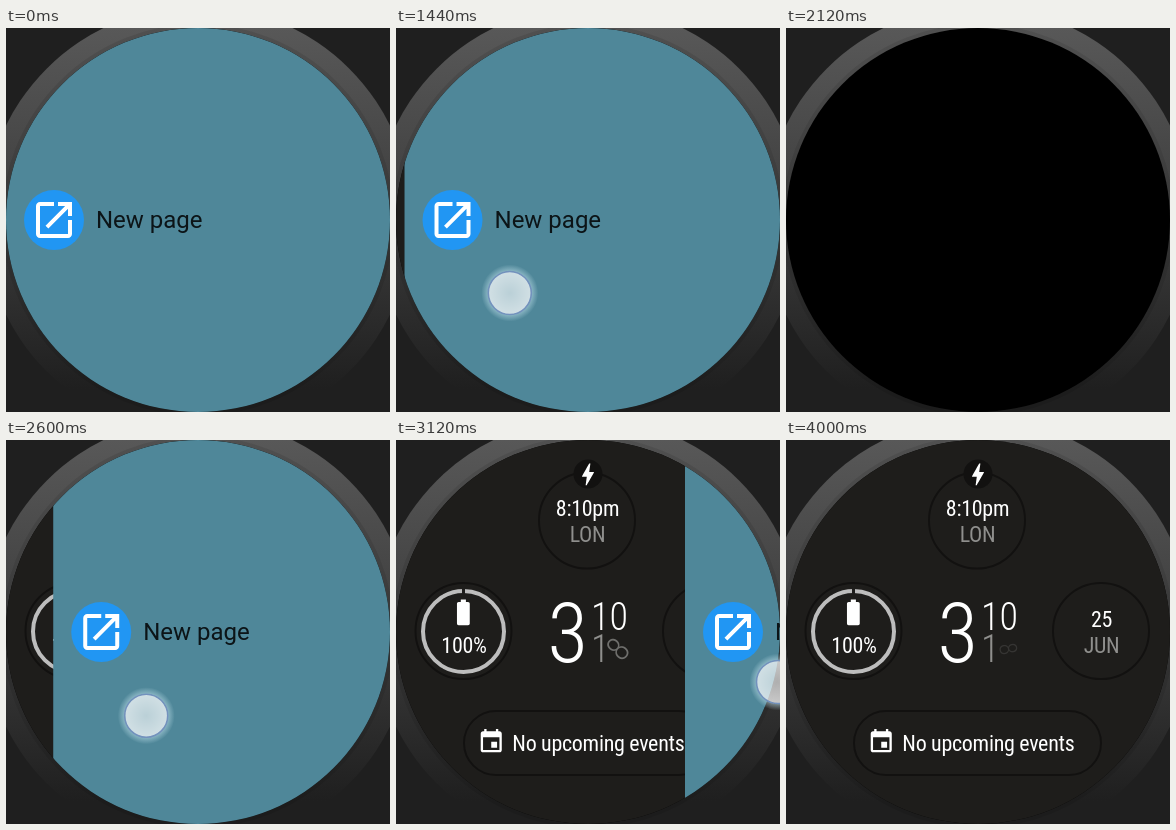
Animation of 384 by 384 pixels, one loop 4040 ms. Source, as an HTML page:

```html
<!DOCTYPE html>
<html lang="en">
<head>
<meta charset="utf-8">
<title>Swipe to dismiss</title>
<style>
  html, body { margin: 0; width: 100%; height: 100%; overflow: hidden; background: #1f1f1f; }
  svg { display: block; width: 100vw; height: 100vh; }
  .label { font: 24px Roboto, sans-serif; fill: #0c1417; }
  .narrow text { font-family: "Roboto Condensed", Roboto, sans-serif; font-stretch: condensed; font-size: 22px; letter-spacing: -.3px; fill: #fff; }
  .narrow .dim { fill: #8f8f8d; }
  .narrow .mid { text-anchor: middle; }
  .narrow .hour { font-size: 83px; font-weight: 300; letter-spacing: 0; }
  .narrow .small { font-size: 38px; font-weight: 300; letter-spacing: 0; }
  .outline { fill: none; stroke: #121110; stroke-width: 2; }
</style>
</head>
<body>
<svg viewBox="0 0 384 384">
  <defs>
    <linearGradient id="metal" gradientUnits="userSpaceOnUse" x1="0" y1="0" x2="0" y2="384">
      <stop offset="0" stop-color="#585858"/>
      <stop offset=".26" stop-color="#4a4a4a"/>
      <stop offset=".5" stop-color="#3c3c3c"/>
      <stop offset=".76" stop-color="#2b2b2b"/>
      <stop offset=".94" stop-color="#1f1f1f"/>
    </linearGradient>
    <radialGradient id="core">
      <stop offset="0" stop-color="#fff" stop-opacity=".61"/>
      <stop offset="1" stop-color="#fff" stop-opacity=".74"/>
    </radialGradient>
    <radialGradient id="glow">
      <stop offset=".76" stop-color="#bfe0ea" stop-opacity="0"/>
      <stop offset=".77" stop-color="#bfe0ea" stop-opacity=".5"/>
      <stop offset="1" stop-color="#bfe0ea" stop-opacity="0"/>
    </radialGradient>
    <clipPath id="lens"><circle cx="192" cy="192" r="192"/></clipPath>
  </defs>

  <rect width="384" height="384" fill="#1f1f1f"/>
  <circle cx="192" cy="192" r="214" fill="url(#metal)"/>
  <circle cx="192" cy="192" r="194" fill="none" stroke="#000" stroke-opacity=".09" stroke-width="4"/>
  <circle cx="192" cy="192" r="192" fill="#000"/>

  <g clip-path="url(#lens)">
    <g id="face" class="narrow">
      <rect width="384" height="384" fill="#1e1d1b"/>

      <circle class="outline" cx="67.5" cy="191" r="48"/>
      <circle cx="67.5" cy="191.5" r="40.5" fill="none" stroke="#bdbdbd" stroke-width="4"/>
      <path d="M67.5 148v6" stroke="#1e1d1b" stroke-width="3"/>
      <path fill="#fff" transform="translate(52 157) scale(1.28)" d="M15.67 4H14V2h-4v2H8.33C7.6 4 7 4.6 7 5.33v15.33C7 21.4 7.6 22 8.33 22h7.33c.74 0 1.34-.6 1.34-1.33V5.33C17 4.6 16.4 4 15.67 4z"/>
      <text class="mid" data-at="68 213">100%</text>

      <circle class="outline" cx="191" cy="80.5" r="48"/>
      <circle cx="192" cy="34" r="14.5" fill="#121110"/>
      <path fill="#fff" transform="translate(177.6 20) scale(1.2)" d="M11 21h-1l1-7H7.5c-.58 0-.57-.32-.38-.66C8.48 10.94 10.42 7.54 13 3h1l-1 7h3.5c.49 0 .56.33.47.51C12.96 17.55 11 21 11 21z"/>
      <text class="mid" data-at="191.5 76">8:10pm</text>
      <text class="mid dim" data-at="191.5 102">LON</text>

      <circle class="outline" cx="315" cy="191" r="48"/>
      <text class="mid" data-at="315.5 187">25</text>
      <text class="mid dim" data-at="315.5 213">JUN</text>

      <rect class="outline" x="68" y="271" width="247" height="64" rx="32"/>
      <path fill="#fff" transform="translate(81.2 287.8) scale(1.17)" d="M17 12h-5v5h5v-5zM16 1v2H8V1H6v2H5c-1.11 0-1.99.9-1.99 2L3 19c0 1.1.89 2 2 2h14c1.1 0 2-.9 2-2V5c0-1.1-.9-2-2-2h-1V1h-2zm3 18H5V8h14v11z"/>
      <text id="events" data-at="116.3 311">No upcoming events</text>

      <text class="mid hour" data-at="171.7 222">3</text>
      <text class="small" data-at="195 190">10</text>
      <text class="small dim" data-at="195 222">1</text>
      <g id="second"><text class="mid small dim" data-at="0 13">8</text></g>
    </g>

    <g id="page">
      <rect width="384" height="384" fill="#4f8799"/>
      <circle cx="48" cy="192" r="30" fill="#2196f3"/>
      <path fill="#fff" transform="translate(24 168) scale(2)" d="M19 19H5V5h7V3H5c-1.11 0-2 .9-2 2v14c0 1.1.89 2 2 2h14c1.1 0 2-.9 2-2v-7h-2v7zM14 3v2h3.59l-9.83 9.83 1.41 1.41L19 6.41V10h2V3h-7z"/>
      <text class="label" x="90" y="200">New page</text>
    </g>
  </g>

  <g id="touch">
    <circle r="28.5" fill="url(#glow)"/>
    <circle r="21.5" fill="url(#core)"/>
    <circle r="21.5" fill="none" stroke="#7392bd" stroke-width="1.6"/>
  </g>
</svg>
<script>
const LOOP = 4040, STEP = 40;
const TOUCH = 1000, BLACK = 2120, RETURN = 2480, FLING = 3000;
const $ = id => document.getElementById(id);
const face = $('face'), page = $('page'), touch = $('touch'), second = $('second');

const ramp = (t, from, to) => Math.min(1, Math.max(0, (t - from) / (to - from)));
const smooth = k => k * k * (3 - 2 * k);
const since = (t, from) => Math.max(0, t - from);

// Accelerating drag that ends in a steady fling.
function firstDrag(t) {
  const x = 92 * ramp(t, 1300, 1760) ** 2 + 1.3 * since(t, 1760);
  return { x, tx: 106 + x * 84 / 92, ty: 265 };
}

// Drag, near pause, then a fling.
function secondDrag(t) {
  const x = 120 * smooth(ramp(t, RETURN, 2760)) + 16 * ramp(t, 2760, FLING) + 1.275 * since(t, FLING);
  const ty = 278 - 10 * ramp(t, RETURN, FLING) - 26 * ramp(t, FLING, 3120);
  return { x, tx: x + 93, ty };
}

// Quarter turns of the seconds digit: it swings in, rests and swings out.
function digitTurn(t) {
  if (t < BLACK) return 0;
  return ramp(t, 3840, 4020) - (1 - ramp(t, FLING, 3440)) ** 2;
}

function show(node, on) {
  node.style.display = on ? '' : 'none';
}

function placeText() {
  // Without a condensed face installed, narrow the regular one evenly.
  const wide = $('events').getComputedTextLength() > 22 * 8.5;
  const narrow = wide ? .885 : 1;
  for (const text of document.querySelectorAll('[data-at]')) {
    text.setAttribute('transform', `translate(${text.dataset.at}) scale(${narrow} 1)`);
  }
}

function draw(t) {
  const black = t >= BLACK && t < RETURN;
  show(face, !black);
  show(page, !black);

  const { x, tx, ty } = t < RETURN ? firstDrag(t) : secondDrag(t);
  page.setAttribute('transform', `translate(${x} 0)`);
  show(touch, t >= TOUCH && !black);
  touch.setAttribute('transform', `translate(${tx} ${ty})`);

  const turn = digitTurn(t), fade = turn * turn;
  second.setAttribute('transform', `translate(222 209) rotate(${90 * turn}) scale(${1 - .45 * fade})`);
  second.setAttribute('opacity', 1 - fade);
}

placeText();
const start = performance.now();
function tick() {
  const t = (performance.now() - start) % LOOP;
  draw(Math.floor(t / STEP) * STEP);
  requestAnimationFrame(tick);
}
tick();
</script>
</body>
</html>
```
